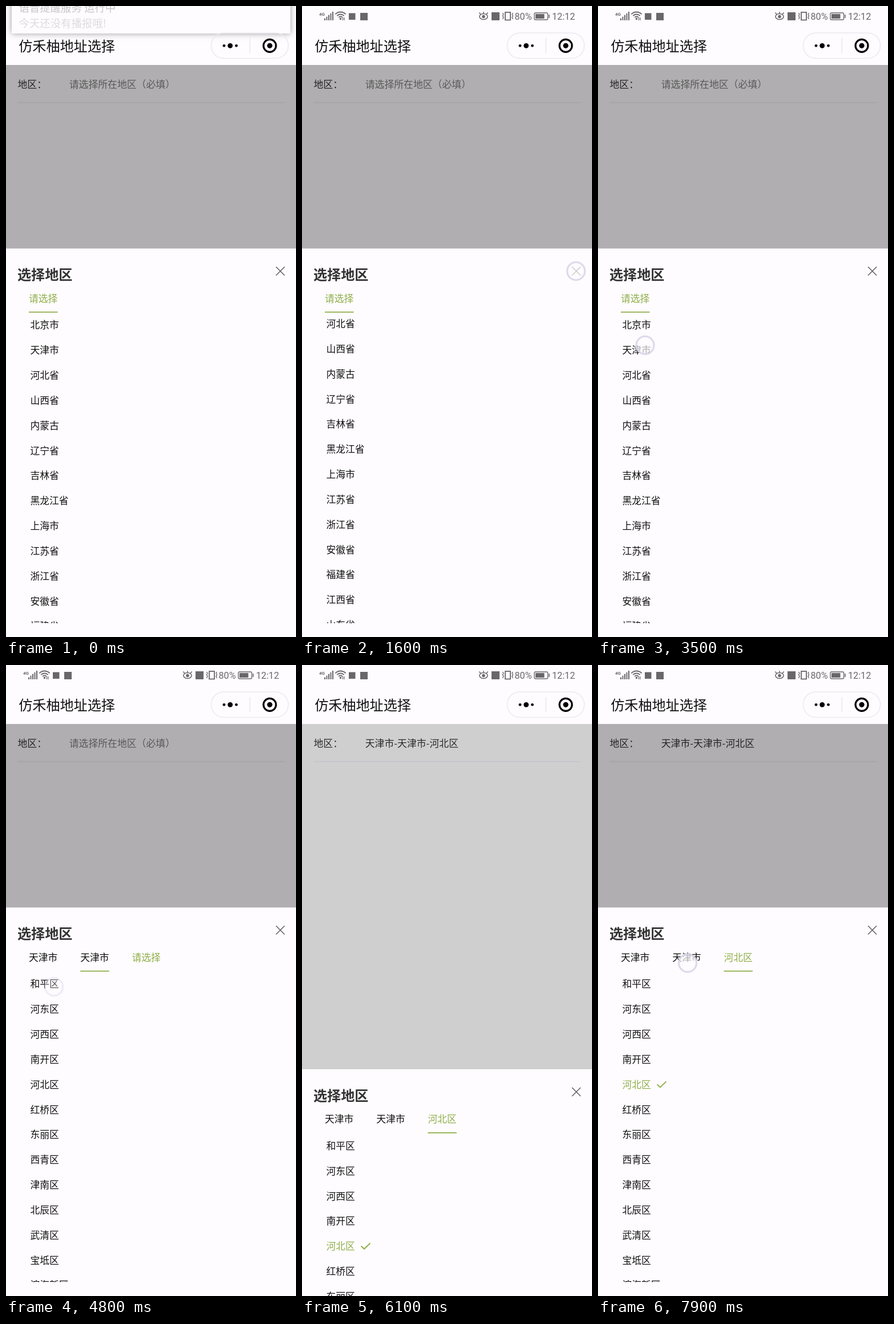
Recreate the animation shown at these times as an HTML page with a canvas. Size 508 px wide and 1102 px high, loop 8000 ms.

```html
<!DOCTYPE html>
<html lang="zh-CN">
<head>
<meta charset="utf-8">
<title>地址选择</title>
<style>
html, body { margin: 0; width: 508px; height: 1102px; overflow: hidden; background: #fefcfe; }
canvas { display: block; }
</style>
</head>
<body>
<canvas id="stage" width="508" height="1102"></canvas>
<script>
const ctx = document.getElementById('stage').getContext('2d');
const W = 508, H = 1102, LOOP = 8000;
const PAPER = '#fefcfe', GREEN = '#8fae4a', STATUS = '#69676a';
const CJK = '"Noto Sans CJK SC", "Noto Sans CJK", sans-serif';
const ROW = 43.82, LIST_TOP = 536, LIST_BOTTOM = 1078, TAB_STEP = 90.2;

const provinces = '北京市 天津市 河北省 山西省 内蒙古 辽宁省 吉林省 黑龙江省 上海市 江苏省 浙江省 安徽省 福建省 江西省 山东省'.split(' ');
const districts = '和平区 河东区 河西区 南开区 河北区 红桥区 东丽区 西青区 津南区 北辰区 武清区 宝坻区 滨海新区'.split(' ');
const lists = [provinces, ['天津市'], districts, districts];
const tabSets = [['请选择'], ['天津市', '请选择'], ['天津市', '天津市', '请选择'], ['天津市', '天津市', '河北区']];
const picks = [3720, 4800, 5680];

const touches = [
  { from: 420, to: 820, x: 273, y: t => 735 - scrollAt(t) },
  { from: 1480, to: 1660, x: 480, y: () => 463 },
  { from: 2180, to: 2380, x: 319, y: () => 133 },
  { from: 3480, to: 3640, x: 82.5, y: () => 592.5 },
  { from: 4580, to: 4700, x: 84, y: () => 562 },
  { from: 5480, to: 5650, x: 70, y: () => 734 },
  { from: 6880, to: 7015, x: 363.5, y: () => 150.5 },
  { from: 7880, to: 8000, x: 157, y: () => 520.5 }
];

const clamp = v => Math.max(0, Math.min(1, v));
const progress = (t, a, b) => clamp((t - a) / (b - a));
const smooth = p => p * p * (3 - 2 * p);
const easeOut = p => 1 - (1 - p) ** 2;

function scrollAt(t) {
  return t < 2300 ? 90 * smooth(progress(t, 420, 800)) : 0;
}

function openAt(t) {
  if (t < 2300) return 1 - smooth(progress(t, 1740, 1890));
  if (t < 6000) return easeOut(progress(t, 2550, 2700));
  if (t < 7000) return 1 - smooth(progress(t, 6030, 6190));
  return easeOut(progress(t, 7210, 7360));
}

function barAlpha(t) {
  if (t < 2300) return progress(t, 420, 520) * (1 - progress(t, 1250, 1500));
  if (t < 3500) return 1 - progress(t, 2850, 3100);
  if (t > 7200) return 1 - progress(t, 7510, 7760);
  return 0;
}

// y is the vertical middle of the ideograph box
function label(str, x, y, size, color, weight = 400) {
  ctx.font = `${weight} ${size}px ${CJK}`;
  ctx.fillStyle = color;
  ctx.fillText(str, x, y + size * 0.38);
}

function box(x, y, w, h, color) {
  ctx.fillStyle = color;
  ctx.fillRect(x, y, w, h);
}

function disc(x, y, r, color) {
  ctx.fillStyle = color;
  ctx.beginPath();
  ctx.arc(x, y, r, 0, 7);
  ctx.fill();
}

function arc(x, y, r, a, b) {
  ctx.beginPath();
  ctx.arc(x, y, r, a, b);
  ctx.stroke();
}

function path(color, width, ...points) {
  ctx.strokeStyle = color;
  ctx.lineWidth = width;
  ctx.beginPath();
  points.forEach(([x, y]) => ctx.lineTo(x, y));
  ctx.stroke();
}

function statusText(str, x, y, size) {
  ctx.font = `${size}px Roboto, sans-serif`;
  ctx.fillStyle = STATUS;
  ctx.fillText(str, x, y);
}

function drawStatusBar() {
  ctx.font = 'bold 8px Roboto, sans-serif';
  ctx.fillStyle = STATUS;
  ctx.fillText('4G', 30, 17);
  for (let i = 0; i < 5; i++) {
    const h = 3.5 + i * 2.9;
    box(39 + i * 3.5, 25 - h, 2, h, STATUS);
  }

  ctx.strokeStyle = STATUS;
  ctx.lineWidth = 1.8;
  [4.5, 8.5, 12.5].forEach(r => arc(67.5, 23, r, -Math.PI * 0.76, -Math.PI * 0.24));
  disc(67.5, 22.5, 1.8, STATUS);
  path(STATUS, 1.2, [71.5, 20], [71.5, 25]);
  path(STATUS, 1.2, [74, 20], [74, 25]);

  box(82, 12.5, 11.5, 11.5, STATUS);
  box(102, 12, 13, 13, STATUS);

  ctx.strokeStyle = STATUS;
  ctx.lineWidth = 1.6;
  ctx.beginPath();
  ctx.ellipse(318, 18.5, 7, 5, 0, 0, 7);
  ctx.stroke();
  disc(318, 18.5, 2.7, STATUS);
  path(STATUS, 1.5, [318, 13], [318, 10]);
  path(STATUS, 1.5, [313, 14.5], [310.5, 11.5]);
  path(STATUS, 1.5, [323, 14.5], [325.5, 11.5]);

  box(332, 11, 14, 14, STATUS);

  ctx.lineWidth = 1.8;
  ctx.strokeRect(356, 11, 9, 13.5);
  path(STATUS, 1.4, [351.5, 12], [353, 14.5], [351.5, 17], [353, 20], [351.5, 23]);
  path(STATUS, 1.4, [369.5, 12], [368, 14.5], [369.5, 17], [368, 20], [369.5, 23]);

  statusText('80%', 372.5, 23.5, 16.2);
  ctx.strokeStyle = STATUS;
  ctx.lineWidth = 1.4;
  ctx.beginPath();
  ctx.roundRect(407, 12, 23.5, 12, 2);
  ctx.stroke();
  box(409, 14, 15.5, 8, STATUS);
  box(432, 15, 1.6, 6, STATUS);
  statusText('12:12', 438, 23.5, 16.2);
}

function drawHeader() {
  label('仿禾柚地址选择', 22.2, 70, 24.1, '#111');
  ctx.strokeStyle = '#ebe9ef';
  ctx.lineWidth = 1.5;
  ctx.beginPath();
  ctx.roundRect(359.5, 47, 135, 44.5, 22);
  ctx.stroke();
  path('#e6e4e9', 1.3, [427.2, 56], [427.2, 82]);
  disc(382, 69.3, 2.4, '#000');
  disc(392.7, 69.3, 4.4, '#000');
  disc(403.5, 69.3, 2.4, '#000');
  ctx.strokeStyle = '#000';
  ctx.lineWidth = 3.2;
  arc(462, 69.3, 11, 0, 7);
  disc(462, 69.3, 4.6, '#000');
}

function drawField(done) {
  label('地区：', 20.5, 136.5, 16.85, '#333');
  if (done) label('天津市-天津市-河北区', 110.7, 136.5, 16.85, '#333');
  else label('请选择所在地区（必填）', 110.7, 136.5, 16.85, '#808080');
  box(20, 167.7, 468, 1.8, '#f1eff5');
}

function drawList(t, level) {
  const scroll = scrollAt(t);
  ctx.save();
  ctx.beginPath();
  ctx.rect(0, LIST_TOP, W, LIST_BOTTOM - LIST_TOP);
  ctx.clip();
  lists[level].forEach((name, i) => {
    const y = 557.1 + i * ROW - scroll;
    const picked = level === 3 && name === '河北区';
    label(name, 42.5, y, 16.8, picked ? GREEN : '#111');
    if (picked) path(GREEN, 2, [103.5, y], [109, y + 5], [119.5, y - 5]);
  });
  if (level === 0 || (level === 3 && t > 7200)) {
    ctx.globalAlpha = barAlpha(t);
    box(505.3, LIST_TOP + scroll * 0.35, 2.7, level ? 410 : 190, '#b9b7bc');
  }
  ctx.restore();
}

function drawPanel(t, level) {
  const open = openAt(t);
  if (open <= 0) return;
  box(0, 103, W, H - 103, `rgba(0,0,0,${0.31 * open})`);
  ctx.save();
  ctx.translate(0, (1 - open) * (H - 423));
  box(0, 423.5, W, H, PAPER);
  label('选择地区', 20, 469.3, 24.1, '#333', 700);
  path('#5c5a5d', 1.4, [473, 455.5], [488, 470.5]);
  path('#5c5a5d', 1.4, [488, 455.5], [473, 470.5]);

  const active = Math.min(level, 2);
  tabSets[level].forEach((name, i) =>
    label(name, 40 + i * TAB_STEP, 510.5, 16.8, i === active ? GREEN : '#111'));
  const slide = active && level < 3
    ? smooth(progress(t, picks[level - 1], picks[level - 1] + 260)) : 1;
  box(40 + (active - 1 + slide) * TAB_STEP, 533.7, 50.5, 1.8, GREEN);
  drawList(t, level);
  ctx.restore();
}

function drawNotice(t) {
  const p = progress(t, 20, 260);
  if (p >= 1) return;
  box(0, 0, W, 46 * (1 - p), PAPER);
  ctx.save();
  ctx.translate(0, -70 * p);
  ctx.shadowColor = 'rgba(80,78,82,.55)';
  ctx.shadowBlur = 10;
  box(10, -60, 488, 108, PAPER);
  ctx.shadowColor = 'transparent';
  label('语音提醒服务 运行中', 22.5, 3, 18.4, '#c6c4c8');
  label('今天还没有播报哦!', 22.5, 30.5, 18.4, '#dddbdf');
  ctx.restore();
}

function drawTouch(t) {
  for (const { from, to, x, y } of touches) {
    if (t < from || t > to + 180) continue;
    const cy = y(t);
    ctx.save();
    ctx.globalAlpha = 1 - progress(t, to, to + 180);
    disc(x, cy, 15, 'rgba(254,252,254,.68)');
    ctx.strokeStyle = 'rgba(214,210,234,.4)';
    ctx.lineWidth = 4;
    arc(x, cy, 15.4, 0, 7);
    ctx.strokeStyle = '#d7d4e8';
    ctx.lineWidth = 1.8;
    arc(x, cy, 15.6, 0, 7);
    ctx.restore();
  }
}

function render(t) {
  const level = picks.filter(p => t >= p).length;
  box(0, 0, W, H, PAPER);
  drawStatusBar();
  drawField(level === 3);
  drawPanel(t, level);
  drawNotice(t);
  drawHeader();
  drawTouch(t);
}

const start = performance.now();
function tick() {
  render((performance.now() - start) % LOOP);
  requestAnimationFrame(tick);
}
tick();
</script>
</body>
</html>
```
